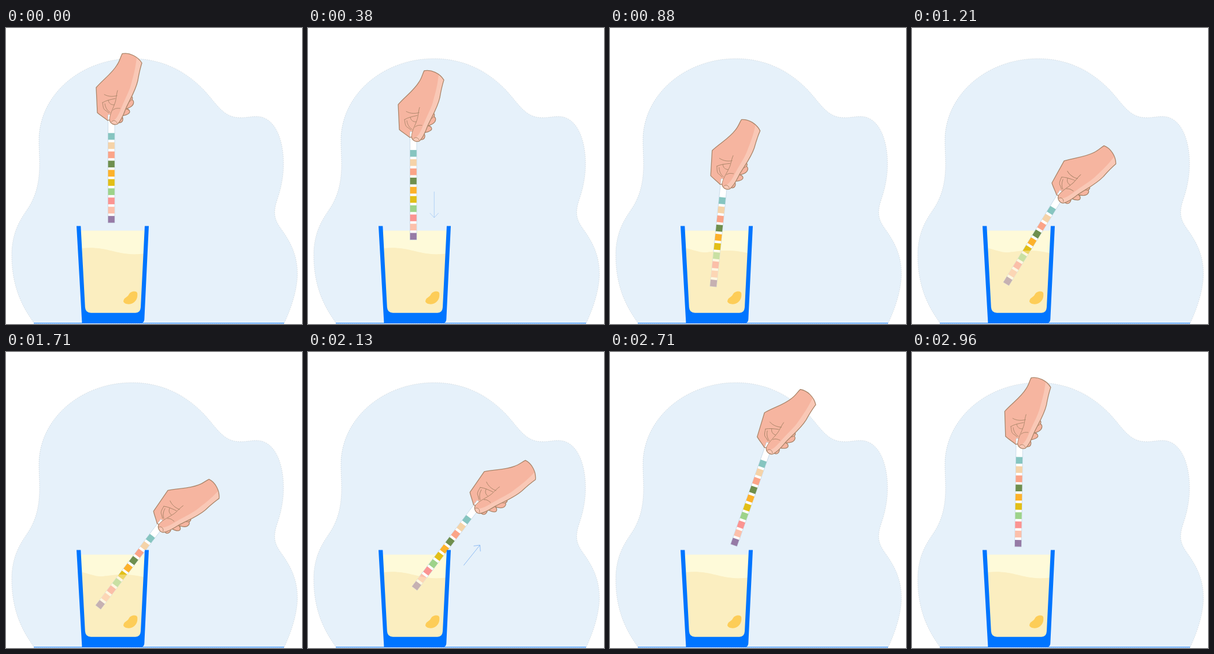
These frames come from a looping animation (512x512 px, 3000 ms). An HTML page:

```html
<!DOCTYPE html>
<html lang="en">
<head>
<meta charset="utf-8">
<title>Test strip</title>
<style>
  html, body { margin: 0; width: 100%; height: 100%; overflow: hidden; background: #fff; }
  svg { display: block; width: 100%; height: 100%; }
  .line { fill: none; stroke: #a98468; stroke-width: 1.3; stroke-linecap: round; stroke-linejoin: round; }
  .thin { stroke-width: .9; }
  .skin { fill: #f6b5a0; }
  .arrow { fill: none; stroke: #7fb2f2; stroke-width: .9; opacity: 0; }
</style>
</head>
<body>
<svg viewBox="0 0 512 512">
  <defs>
    <path id="palm" d="M201 44.5C213 42 228 49 235 60.5C232 70 230 79 228 91C224 109 213 126 207 140C203 151 199 161 193 166C187 169 180 165 179 159L176 160C170 155 163 151 158 146.5L156 103C168 89 183 79 192 64C197 57 198 50 201 44.5Z"/>
    <path id="arrow" d="M0 -45V0M-7.5 -8L0 0L7.5 -8"/>
    <path id="liquid"/>
  </defs>

  <path fill="#e6f1fa" stroke="#aab4bb" stroke-width=".5" stroke-dasharray="1.5 2" d="M49 511C30 485 10 450 10 393C10 355 24 333 34 318C52 293 58 268 58 235C58 220 57 208 57 195C57 115 130 53 218 53C275 53 315 79 342 107C366 133 376 155 405 155C418 155 424 153 433 153C465 153 480 192 480 235C480 258 475 280 469 297C460 324 466 334 479 352C495 375 505 398 504 430C502 460 492 487 481 511Z"/>
  <path stroke="#0a7bff" d="M48 510.5H481"/>

  <path fill="#fefad9" d="M128 350.5H241L236 420H132Z"/>
  <use href="#liquid" fill="#fbeec0"/>

  <g id="hand">
    <path class="skin" d="M212 118C216 116 220.500 119 218 124C222 126 221.500 132 217 135.500C214 138 210 139 208 140C213 140 216 145 212 148C208 151 203 151.500 200 152C203.500 156 202.500 162.500 198 163.500C190 165 185 160 184 156L196 120Z" stroke="#a98468" stroke-width="1.3"/>
    <path class="line thin" d="M218 124C215 127 212 128 209 129M208 140L204 141M200 152L197 152"/>
    <use href="#palm" class="skin"/>
    <g id="strip">
      <rect x="176.4" y="150" width="11.6" height="187" fill="#fff" stroke="#b3cbdd" stroke-width=".6"/>
    </g>
    <path class="skin" d="M193 110C190 124 179 148 179 159C180 165 187 169 193 166C199 161 203 151 207 140Z"/>
    <path fill="#f9c8b6" d="M235 60.5C232 70 230 79 228 91C224 109 213 126 207 140C203 151 199 161 193 166C187 168 183 166 180 162C190 162 195 150 200 137C208 118 214 108 217 95C221 80 224 70 226 51Z"/>
    <use href="#palm" class="line"/>
    <path class="line thin" d="M193 108C190 118 191 124 188 131C185 140 179 150 179 159M170 115C177 119 185 119 192 117M167 129C174 125 180 124 189 122M171 131C172 137 174 142 180 146M177 125C178 131 182 133 187 133M167 129C168 136 168 141 173 143L178 147M185 142C189 138 194 139 197 139M182 163C184 159 190 159 192 164"/>
  </g>

  <use href="#liquid" fill="#fbeec0" opacity=".47"/>
  <path fill="#fdcd58" d="M203 473C205 479 217 479 222 474C227 470 228 463 227 458C225 454 216 455 213 460C210 467 204 465 203 473Z"/>
  <path fill="#0075ff" d="M122 342.5H129.3L136.8 483Q137.5 492.700 147 492.700H224Q232.5 492.700 233 483L240 342.5H247L239.3 504Q238.8 510.8 232 510.8H131.5Z"/>

  <use href="#arrow" id="down" class="arrow" transform="translate(218.3 328)"/>
  <use href="#arrow" id="up" class="arrow" transform="translate(297.400 334) rotate(218.7)"/>
</svg>
<script>
const LOOP = 3000;
const $ = id => document.getElementById(id);

const pads = ['#86c5c0', '#f5d3a8', '#fba488', '#6f8f4e', '#fdb22b',
              '#e2bf17', '#9dd38a', '#fb9492', '#fcc0ab', '#967ba6'];
pads.forEach((fill, i) => {
  const pad = document.createElementNS('http://www.w3.org/2000/svg', 'rect');
  const box = { x: 176.6, y: 181.7 + i * 15.94, width: 11.2, height: 11.6, fill };
  for (const key in box) pad.setAttribute(key, box[key]);
  $('strip').append(pad);
});

const mix = (a, b, k) => a + (b - a) * k;
const ramp = (t, from, to) => Math.min(1, Math.max(0, (t - from) / (to - from)));
const ease = u => (1 - Math.cos(Math.PI * u)) / 2;
const move = (t, from, to) => ease(ramp(t, from, to));

// Centre of the lowest pad and tilt of the strip
const poses = [[182, 331, 0], [182, 442.3, 0], [162.8, 436.8, 37.2], [247, 326.5, 37.2], [182, 331, 0]];

function poseAt(t) {
  const steps = [
    move(t, 208, 712),
    move(t, 703, 1383),
    move(t, 1915, 2505),
    ease(ramp(t, 2500, 3020) ** .8),
  ];
  return poses[0].map((start, axis) =>
    steps.reduce((sum, k, i) => sum + k * (poses[i + 1][axis] - poses[i][axis]), start));
}

// Control points of the liquid surface at rest and when disturbed
const calm = [132, 381, 150, 379, 165, 381, 185, 386, 220, 393, 240, 390];
const stirred = [132, 381, 145, 384, 155, 389, 168, 388, 205, 381, 240, 390];

function surface(k) {
  const p = calm.map((v, i) => mix(v, stirred[i], k));
  return `M${p.slice(0, 2)}C${p.slice(2, 8)}S${p.slice(8)}L236 494H134Z`;
}

const fade = (t, a, b, c, d) => ramp(t, a, b) * (1 - ramp(t, c, d));

function draw(now) {
  const t = now % LOOP;
  const [x, y, tilt] = poseAt(t);
  $('hand').setAttribute('transform', `translate(${x - 182} ${y - 331}) rotate(${tilt} 182 331)`);
  $('liquid').setAttribute('d', surface(move(t, 560, 820) - move(t, 1750, 2080)));
  $('down').style.opacity = fade(t, 280, 460, 580, 740);
  $('up').style.opacity = fade(t, 2000, 2150, 2330, 2470);
  requestAnimationFrame(draw);
}
requestAnimationFrame(draw);
</script>
</body>
</html>
```
